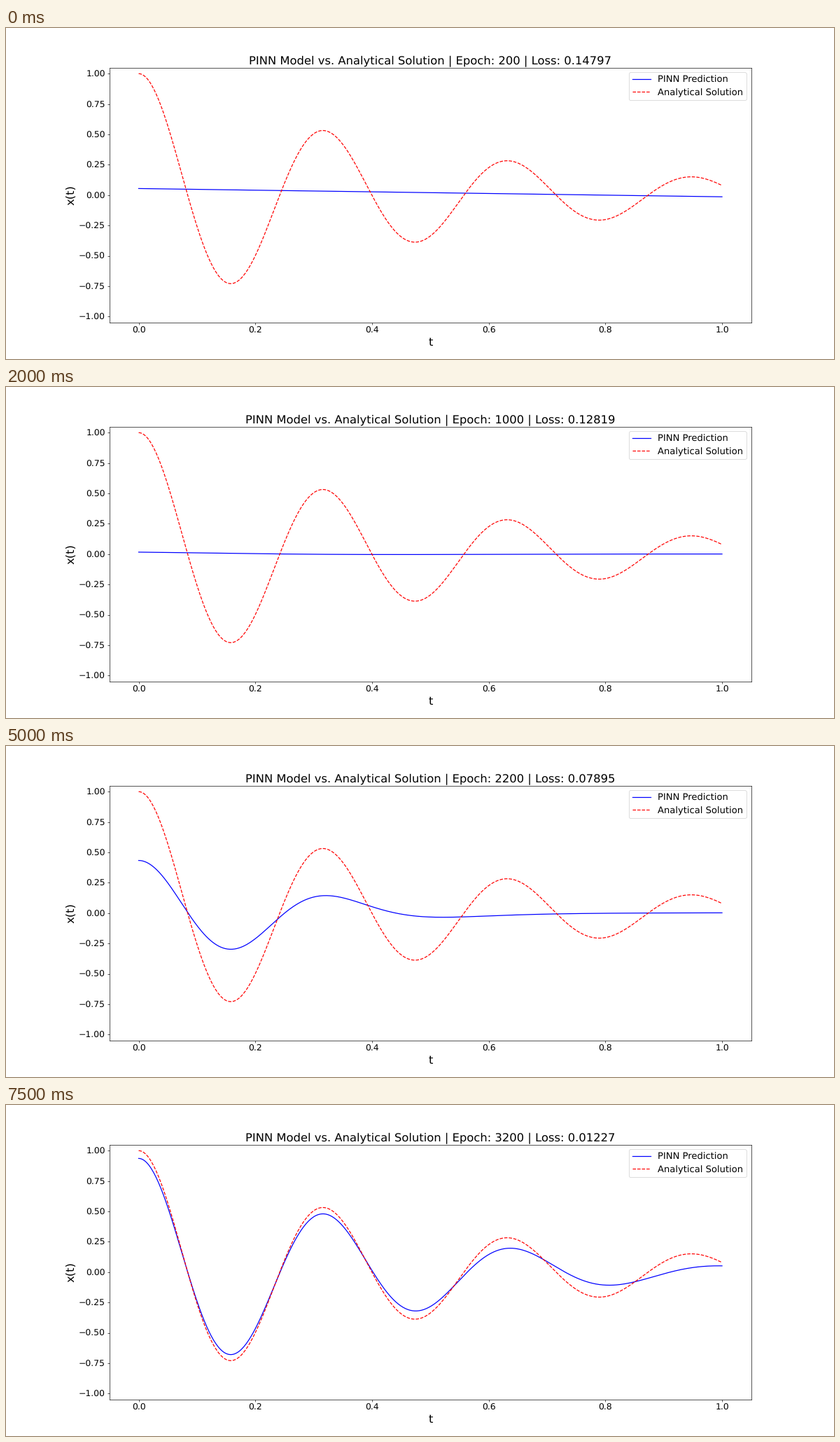
Recreate the animation shown at these times as a matplotlib script. Size 1183x473 px, loop 8000 ms.

```python
import numpy as np
import matplotlib.pyplot as plt
from matplotlib.animation import FuncAnimation

plt.rcParams["font.family"] = "DejaVu Sans"
plt.rcParams["text.hinting"] = "none"

N = 16
D, W0 = 2.0, 20.0
W = np.sqrt(W0**2 - D**2)
t = np.linspace(0, 1, 500)


def oscillator(t, reach=np.inf):
    """Oscillator released from x = 1 at rest, dying off beyond t = reach."""
    decay = np.exp(-D * t - (t / reach) ** 3)
    rate = D + 3 * t**2 / reach**3
    return decay * (np.cos(W * t) + rate / W * np.sin(W * t))


def early(step):
    """A tilted line that settles into a faint ripple."""
    tilt = 0.25**step
    ripple = (0.004 + 0.003 * step) * np.exp(-3 * t) * np.cos(6 * t)
    return tilt * (0.054 - 0.068 * t) + (1 - tilt) * ripple


def late(step):
    """The oscillator grows in strength and is learned from left to right."""
    amp = np.tanh(np.interp(step, [8, 10, 11, 12, 15],
                            [0.054, 0.464, 0.78, 1.0, 1.705]))
    reach = 0.19 + 0.108 * (step - 8)
    slowed = t / (1 + (t / (1.55 * reach)) ** 4) ** 0.25
    return amp * oscillator(slowed, reach)


def prediction(step):
    return early(step) if step < 8 else late(step)


def loss(step):
    return np.interp(step, [0, 3, 6, 8, 10, 12, 15],
                     [.14797, .12834, .12790, .12518, .07895, .03224, .01227])


fig, ax = plt.subplots(figsize=(20, 8), dpi=59.15)
line, = ax.plot(t, prediction(0), "b-", label="PINN Prediction")
ax.plot(t, oscillator(t), "r--", label="Analytical Solution")
ax.set_xlim(-0.05, 1.05)
ax.set_ylim(-1.05, 1.05)
ax.set_xlabel("t", fontsize=20)
ax.set_ylabel("x(t)", fontsize=20)
ax.tick_params(labelsize=15)
ax.legend(loc="upper right", fontsize=16, labelspacing=0.41, borderpad=0.36)
title = ax.set_title("", fontsize=20)


def update(i):
    line.set_ydata(prediction(i))
    title.set_text("PINN Model vs. Analytical Solution | "
                   f"Epoch: {200 * (i + 1)} | Loss: {loss(i):.5f}")
    return line, title


anim = FuncAnimation(fig, update, frames=N, interval=500, repeat=True,
                     repeat_delay=0, blit=False)
plt.show()
```
